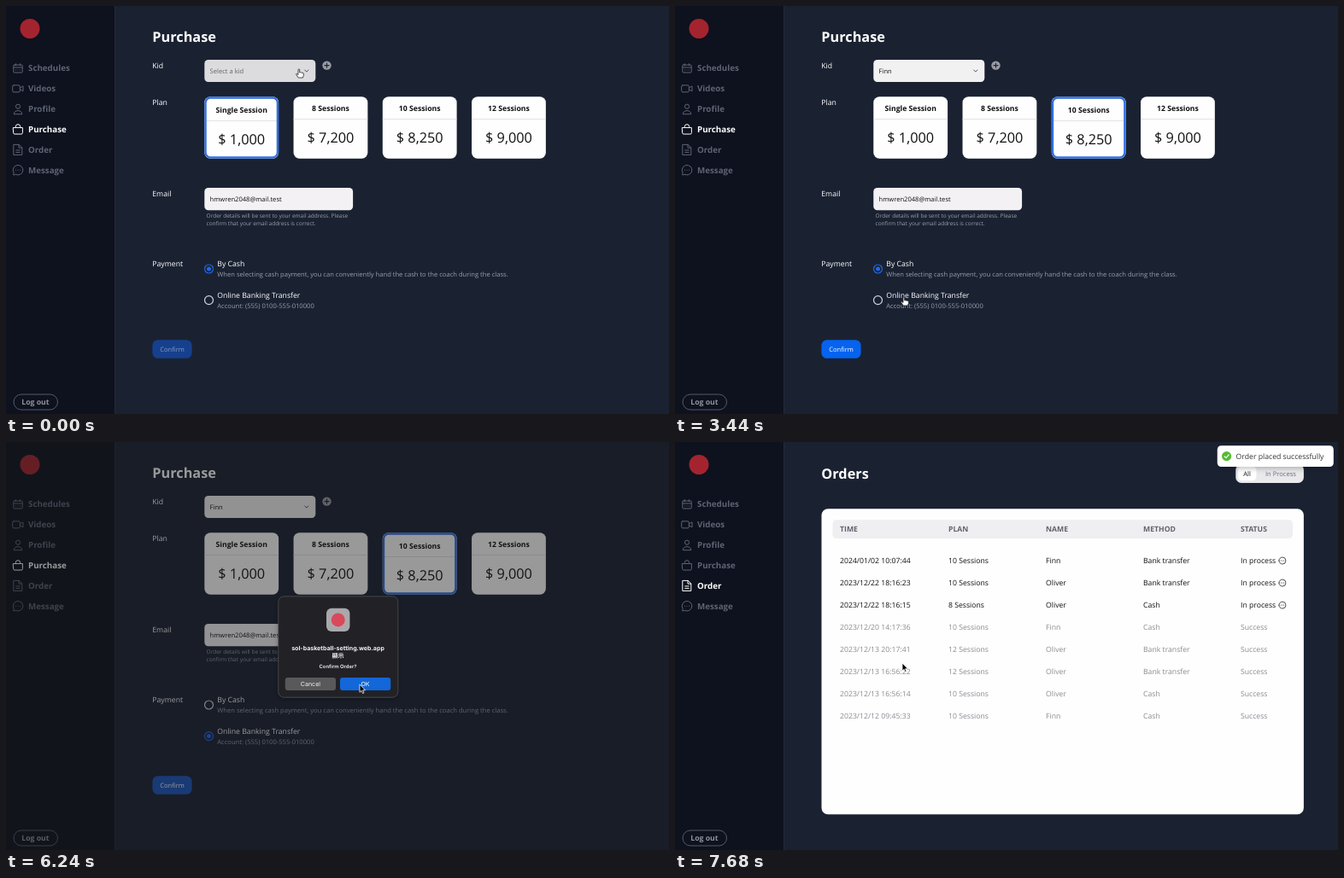
Recreate the animation shown at these times as an HTML page. Size 776 by 478 pixels, loop 7760 ms.

```html
<!DOCTYPE html>
<html lang="en">
<head>
<meta charset="utf-8">
<title>Purchase</title>
<style>
  html, body { margin: 0; width: 100%; height: 100%; overflow: hidden; background: #1a2232; }
  svg { display: block; width: 776px; height: 478px; }
  text { font-family: "Open Sans", "Noto Sans", sans-serif; text-rendering: geometricPrecision; white-space: pre; }
  #dialog text { font-family: Inter, "Noto Sans CJK TC", "Noto Sans CJK", sans-serif; }
  .b { font-weight: 700; }
  .line { fill: none; stroke: currentColor; stroke-linecap: round; stroke-linejoin: round; }
</style>
</head>
<body>
<svg id="stage" viewBox="0 0 776 478" xmlns="http://www.w3.org/2000/svg"></svg>
<script>
const LOOP = 7760, STEP = 80;
const SIZE = { title: 16.3, nav: 9.77, base: 8.69, small: 7.6, tiny: 6.51 };
const BLUE = '#2f6fe0';
const KIDS = ['Finn', 'Oliver'];

// Markup helpers
const rect = (x, y, w, h, r, fill, extra = '') =>
  `<rect x="${x}" y="${y}" width="${w}" height="${h}" rx="${r}" fill="${fill}" ${extra}/>`;
const circle = (x, y, r, fill, extra = '') =>
  `<circle cx="${x}" cy="${y}" r="${r}" fill="${fill}" ${extra}/>`;
const text = (x, y, str, size, fill = '#fff', extra = '') =>
  `<text x="${x}" y="${y}" font-size="${size}" fill="${fill}" ${extra}>${str}</text>`;
const line = (d, width = 1, extra = '') =>
  `<path class="line" d="${d}" stroke-width="${width}" ${extra}/>`;
const group = (id, body, extra = '') => `<g id="${id}" ${extra}>${body}</g>`;
const BOLD = 'class="b"', MID = 'text-anchor="middle"';

// Sidebar
const box = 'M-4.2-4h8.4a1 1 0 0 1 1 1v7a1 1 0 0 1-1 1h-8.4a1 1 0 0 1-1-1v-7a1 1 0 0 1 1-1z';
const NAV = [
  ['Schedules', box + 'M-5-1H5M-2.5-5.3v2M2.5-5.3v2M-2.5 2h.1M0 2h.1M2.5 2h.1'],
  ['Videos', 'M-5-4h6a1.3 1.3 0 0 1 1.3 1.3v5.4A1.3 1.3 0 0 1 1 4h-6a1.3 1.3 0 0 1-1.3-1.3v-5.4A1.3 1.3 0 0 1-5-4zM2.5-1 6-3V3L2.5 1'],
  ['Profile', 'M-2.6-3a2.6 2.6 0 1 0 5.2 0a2.6 2.6 0 1 0-5.2 0M-4.8 5.6c0-5 9.6-5 9.6 0z'],
  ['Purchase', 'M-5.4-2h10.8v6a1.5 1.5 0 0 1-1.5 1.5h-7.8A1.5 1.5 0 0 1-5.4 4zM-2.7-2v-1.2a2.7 2.7 0 0 1 5.4 0V-2'],
  ['Order', 'M-4.8-6h6L4.8-2.5V6h-9.6zM1-6v3.7h3.7M-2.2.5h4.4M-2.2 3h4.4'],
  ['Message', 'M-4.4 5.6-5.4 5.6-4.9 3a5.8 5.8 0 1 1 2.4 2.2zM-2.6 0h.1M0 0h.1M2.6 0h.1'],
];
const sidebar = rect(0, 0, 127, 478, 0, '#0e111e') + rect(127, 0, 1, 478, 0, '#242a39')
  + circle(28, 26.5, 11.5, '#a3242e')
  + NAV.map(([label, icon], i) => {
      const y = 73 + 23.85 * i;
      return group('nav' + i, line(icon, 1, `transform="translate(14 ${y})"`)
        + text(26, y + 3.4, label, SIZE.nav, 'currentColor', BOLD));
    }).join('')
  + rect(9, 455, 51.5, 18, 9, 'none', 'stroke="#5c6270" stroke-width=".9"')
  + text(18.3, 467.2, 'Log out', SIZE.base, '#90949c', BOLD);

// Purchase page
const PLANS = [['Single Session', '1,000'], ['8 Sessions', '7,200'], ['10 Sessions', '8,250'], ['12 Sessions', '9,000']];
const cardX = i => 232.3 + 104.25 * i;
const cards = PLANS.map(([name, price], i) => {
  const x = cardX(i), mid = x + 43.4;
  return rect(x, 106.3, 86.8, 72.4, 7, '#fefefe')
    + group('content' + i, rect(x, 132, 86.8, .8, 0, '#dcdce0')
      + text(mid, 122.7, name, SIZE.base, '#111', BOLD + MID.padStart(MID.length + 1))
      + text(mid, 159.7, '$ ' + price, SIZE.title, '#111', MID))
    + rect(x + 1.2, 107.5, 84.4, 70, 6, 'none', `id="ring${i}" stroke="${BLUE}" stroke-width="2.4"`);
}).join('');

const radio = (id, y) => circle(237.5, y, 5, 'none', `id="${id}" stroke-width="1.2"`)
  + circle(237.5, y, 2.5, '#2068e6', `id="${id}Dot"`);

const avatar = (y, bg, skin, hair) => circle(247.3, y, 6.4, bg)
  + circle(247.3, y - 1, 3, hair) + circle(247.3, y, 2.5, skin)
  + `<path d="M242.7 ${y + 4.4}q4.6-3.6 9.2 0q-4.6 4-9.2 0z" fill="${hair}"/>`;

const menu = rect(232.5, 92.3, 130, 48, 6, '#fefefe', 'filter="url(#shadow)"')
  + rect(237, 96, 121, 19.5, 5, '#c5c5c8', 'id="option"')
  + avatar(105.6, '#e3ddd8', '#c98d70', '#75443a') + avatar(126.4, '#cdd6cf', '#c79a7c', '#4a3d36')
  + KIDS.map((kid, i) => text(258.3, 108.8 + 20.8 * i, kid, SIZE.small, '#111')).join('');

const purchase = text(171.3, 42, 'Purchase', SIZE.title, '#fff', BOLD)
  + [['Kid', 73], ['Plan', 116.3], ['Email', 223], ['Payment', 305.4]]
      .map(([label, y]) => text(171.3, y, label, SIZE.base)).join('')
  + rect(232.3, 63, 130, 26, 4.5, '#f1f1f2', 'id="select"')
  + text(238.6, 78.7, 'Select a kid', SIZE.small, '#62626b', 'id="kid"')
  + line('M-2.1-1 0 1.1 2.1-1', .9, 'id="chevron" color="#44444a"')
  + circle(375.5, 69.6, 5.2, '#989ba2') + line('M373 69.6h5M375.5 67.1v5', 1.1, 'color="#1a2232"')
  + cards + circle(494, 129, 0, '#000', 'id="ripple" clip-path="url(#cardClip)"')
  + rect(232.3, 213, 173.8, 26.2, 4.5, '#f3f1f4')
  + text(238.6, 228.7, 'hmwren2048@mail.test', SIZE.small, '#111')
  + text(234.6, 248.3, 'Order details will be sent to your email address. Please', SIZE.tiny, '#9a9ea7')
  + text(234.6, 257, 'confirm that your email address is correct.', SIZE.tiny, '#9a9ea7')
  + radio('cash', 308) + radio('bank', 344.6)
  + text(247.3, 305.4, 'By Cash', SIZE.base)
  + text(247.3, 317.2, 'When selecting cash payment, you can conveniently hand the cash to the coach during the class.', SIZE.small, '#9a9ea7')
  + text(247.3, 342.3, 'Online Banking Transfer', SIZE.base)
  + text(247.3, 354.2, 'Account: (555) 0100-555-010000', SIZE.small, '#9a9ea7')
  + rect(171.4, 391.2, 46.2, 21.6, 6.5, '#0563ef', 'id="confirm"')
  + text(194.5, 404.8, 'Confirm', SIZE.small, '#fff', 'id="confirmText" ' + MID)
  + group('menu', menu);

// Orders page
const COLUMNS = [193, 320, 434, 548, 662];
const ORDERS = [
  ['2024/01/02 10:07:44', 10, 0, 1], ['2023/12/22 18:16:23', 10, 1, 1],
  ['2023/12/22 18:16:15', 8, 1, 0], ['2023/12/20 14:17:36', 10, 0, 0],
  ['2023/12/13 20:17:41', 12, 1, 1], ['2023/12/13 16:56:22', 12, 1, 1],
  ['2023/12/13 16:56:14', 10, 1, 0], ['2023/12/12 09:45:33', 10, 0, 0],
];
const orderRow = ([time, count, kid, bank], i) => {
  const y = 139 + 26.05 * i, open = i < 3;
  const cells = [time, count + ' Sessions', KIDS[kid], bank ? 'Bank transfer' : 'Cash', open ? 'In process' : 'Success'];
  return cells.map((cell, c) => text(COLUMNS[c], y + 3.1, cell, SIZE.base, open ? '#111' : '#8b8b93')).join('')
    + (open ? line(`M706.9 ${y}a4 4 0 1 1 8 0a4 4 0 1 1-8 0M709.2 ${y}h.1M710.9 ${y}h.1M712.6 ${y}h.1`, .8, 'color="#222"') : '');
};
const orders = text(171.3, 43, 'Orders', SIZE.title, '#fff', BOLD)
  + rect(656.3, 26, 79.6, 22, 6.5, '#e9e9ec') + rect(659, 28.7, 21.4, 16.6, 4.5, '#fff')
  + text(669.5, 39.8, 'All', SIZE.small, '#111', MID) + text(709, 39.8, 'In Process', SIZE.small, '#6c6c75', MID)
  + rect(171.5, 78.2, 564.4, 358, 7.5, '#fefefe') + rect(184.5, 91.2, 538.5, 21.8, 4.5, '#efeff2')
  + ['TIME', 'PLAN', 'NAME', 'METHOD', 'STATUS'].map((h, c) => text(COLUMNS[c], 105.2, h, SIZE.base, '#62626c', BOLD)).join('')
  + ORDERS.map(orderRow).join('')
  + group('toast', rect(634.8, 4.2, 136, 24.8, 4.5, '#fff', 'filter="url(#shadow)"')
    + circle(645.6, 16.6, 5.6, '#55bb33') + line('M643.2 16.9 645 18.7 648.2 14.9', 1.2, 'color="#fff"')
    + text(656.6, 19.8, 'Order placed successfully', SIZE.base, '#333'));

// Browser confirmation
const dialog = rect(318.8, 180.8, 140, 118.4, 6.5, '#222326', 'stroke="#4c4d50" stroke-width=".8" filter="url(#shadow)"')
  + rect(375, 194.7, 27.4, 27.4, 6, '#a9a9ac') + circle(388.7, 208.4, 8, '#d9495a')
  + text(388.5, 243.6, 'sol-basketball-setting.web.app', 7.06, '#f4f4f4', BOLD + ' ' + MID)
  + text(388.5, 253.1, '顯示', 7.06, '#f4f4f4', BOLD + ' ' + MID)
  + text(388.5, 265.4, 'Confirm Order?', 5.9, '#f4f4f4', 'font-weight="600" ' + MID)
  + rect(326.8, 276, 59.2, 15, 3, '#59595c') + rect(391, 276, 59.2, 15, 3, '#1367d8')
  + text(356.4, 285.8, 'Cancel', 7.06, '#f4f4f4', MID) + text(420.5, 285.8, 'OK', 7.06, '#fff', MID);

const cursor = `<path id="arrow" d="M0 0V9.2L2.1 7.3 3.5 10.5 5 9.8 3.6 6.8H6.5Z" fill="#000" stroke="#fff" stroke-width=".8"/>
  <path id="hand" d="M-1 .4q1-1 1.7 0V4q.9-.7 1.6.1q1-.5 1.6.3q1.4-.3 1.5.9V7.5L4.3 10H-.8L-3.6 5.8q.7-1.2 2 .2L-1 6.6Z" fill="#fff" stroke="#222" stroke-width=".8" stroke-linejoin="round"/>`;

document.getElementById('stage').innerHTML = `<defs>
  <filter id="shadow" x="-20%" y="-30%" width="140%" height="180%"><feDropShadow dx="0" dy="2" stdDeviation="3" flood-opacity=".25"/></filter>
  <clipPath id="cardClip">${rect(cardX(2) + 2.4, 108.7, 82, 67.6, 5, '#000')}</clipPath></defs>`
  + rect(0, 0, 776, 478, 0, '#1a2232') + sidebar + group('purchase', purchase) + group('orders', orders)
  + rect(0, 0, 776, 478, 0, '#18181a', 'id="dim"') + group('dialog', dialog) + group('cursor', cursor);

// Motion
const el = {};
document.querySelectorAll('[id]').forEach(node => el[node.id] = node);
const set = (id, attrs) => { for (const k in attrs) el[id].setAttribute(k, attrs[k]); };
const show = (id, on) => set(id, { visibility: on ? 'visible' : 'hidden' });
const ramp = (t, from, to) => Math.min(1, Math.max(0, (t - from) / (to - from)));
const easeInOut = p => p * p * (3 - 2 * p);
const easeOut = p => 1 - (1 - p) ** 3;

const PATH = [
  [0, 343, 74], [320, 343, 74], [1040, 325, 104], [1440, 325, 104], [2080, 494, 129], [2240, 494, 129],
  [2480, 478, 142], [3440, 268, 341], [3760, 266, 342], [4640, 216, 385], [4800, 203, 400], [4960, 203, 400],
  [5280, 274, 410], [5920, 414, 284], [7120, 414, 284], [7680, 266, 259],
];
const pointer = t => {
  const i = Math.max(1, PATH.findIndex(k => k[0] >= t));
  const [t0, x0, y0] = PATH[i - 1], [t1, x1, y1] = PATH[i];
  const p = easeInOut(ramp(t, t0, t1));
  return [x0 + (x1 - x0) * p, y0 + (y1 - y0) * p];
};
const inside = (x, y, [l, top, r, bottom]) => x >= l && x <= r && y >= top && y <= bottom;
const SELECT = [232, 63, 362, 89], FINN = [237, 95, 358, 116];
const CLICKABLE = [SELECT, [232, 299, 361, 312], [232, 336, 361, 355], [171, 391, 218, 413],
  ...PLANS.map((_, i) => [cardX(i), 106, cardX(i) + 87, 179])];

function draw(t) {
  const [x, y] = pointer(t);
  const chosen = t >= 1360, plan = t >= 2240 ? 2 : 0, bank = t >= 3680, done = t >= 6640;
  const menuOn = easeOut(ramp(t, 320, 560)) * (1 - ramp(t, 1360, 1520));
  const dim = ramp(t, 4960, 5120) * (1 - ramp(t, 6240, 6400));
  const busy = ramp(t, 4720, 4960) * (1 - ramp(t, 6400, 6640));
  const wave = ramp(t, 2200, 2760);

  NAV.forEach((_, i) => set('nav' + i, { color: i === (done ? 4 : 3) ? '#fff' : '#5d6473' }));
  show('purchase', !done);
  set('purchase', { display: done ? 'none' : 'inline' });
  set('orders', { display: done ? 'inline' : 'none' });

  set('select', { fill: inside(x, y, SELECT) ? '#dcdcdf' : '#f1f1f2' });
  set('kid', { fill: chosen ? '#111' : '#62626b' });
  el.kid.textContent = chosen ? KIDS[0] : 'Select a kid';
  const flip = 1 - 2 * ramp(t, 320, 480) * (1 - ramp(t, 1360, 1520));
  set('chevron', { transform: `translate(351.8 76) scale(1 ${flip})` });
  const scale = .9 + .1 * menuOn;
  set('menu', { opacity: menuOn, transform: `translate(297.5 92) scale(${scale}) translate(-297.5 -92)` });
  show('option', inside(x, y, FINN));

  PLANS.forEach((_, i) => {
    show('ring' + i, i === plan);
    set('content' + i, { transform: `translate(0 ${i === plan ? 2.2 : 0})` });
  });
  set('ripple', { r: 90 * wave, opacity: wave ? .5 * (1 - wave) : 0 });

  [['cash', !bank], ['bank', bank]].forEach(([id, on]) => {
    set(id, { stroke: on ? '#2068e6' : '#d2d5dc' });
    set(id + 'Dot', { opacity: on ? 1 : 0 });
  });
  const mix = (a, b) => Math.round(a + (b - a) * busy);
  set('confirm', { fill: chosen ? `rgb(${mix(5, 28)},${mix(99, 86)},${mix(239, 189)})` : '#16408e' });
  set('confirmText', { fill: chosen ? '#fff' : '#879bc2' });

  set('dim', { opacity: .44 * dim });
  set('dialog', { opacity: dim });
  const slide = easeOut(ramp(t, 6640, 7040));
  set('toast', { transform: `translate(0 ${-40 * (1 - slide)})` });

  const menuHit = menuOn > 0 && inside(x, y, [232, 92, 362, 140]);
  const hand = t < 4960 && (menuHit || CLICKABLE.some(area => inside(x, y, area)));
  set('cursor', { transform: `translate(${x} ${y})` });
  set('hand', { opacity: hand ? 1 : 0 });
  set('arrow', { opacity: hand ? 0 : 1 });
}

const start = performance.now();
function tick() {
  const t = (performance.now() - start) % LOOP;
  draw(Math.floor(t / STEP) * STEP);
  requestAnimationFrame(tick);
}
tick();
</script>
</body>
</html>
```
